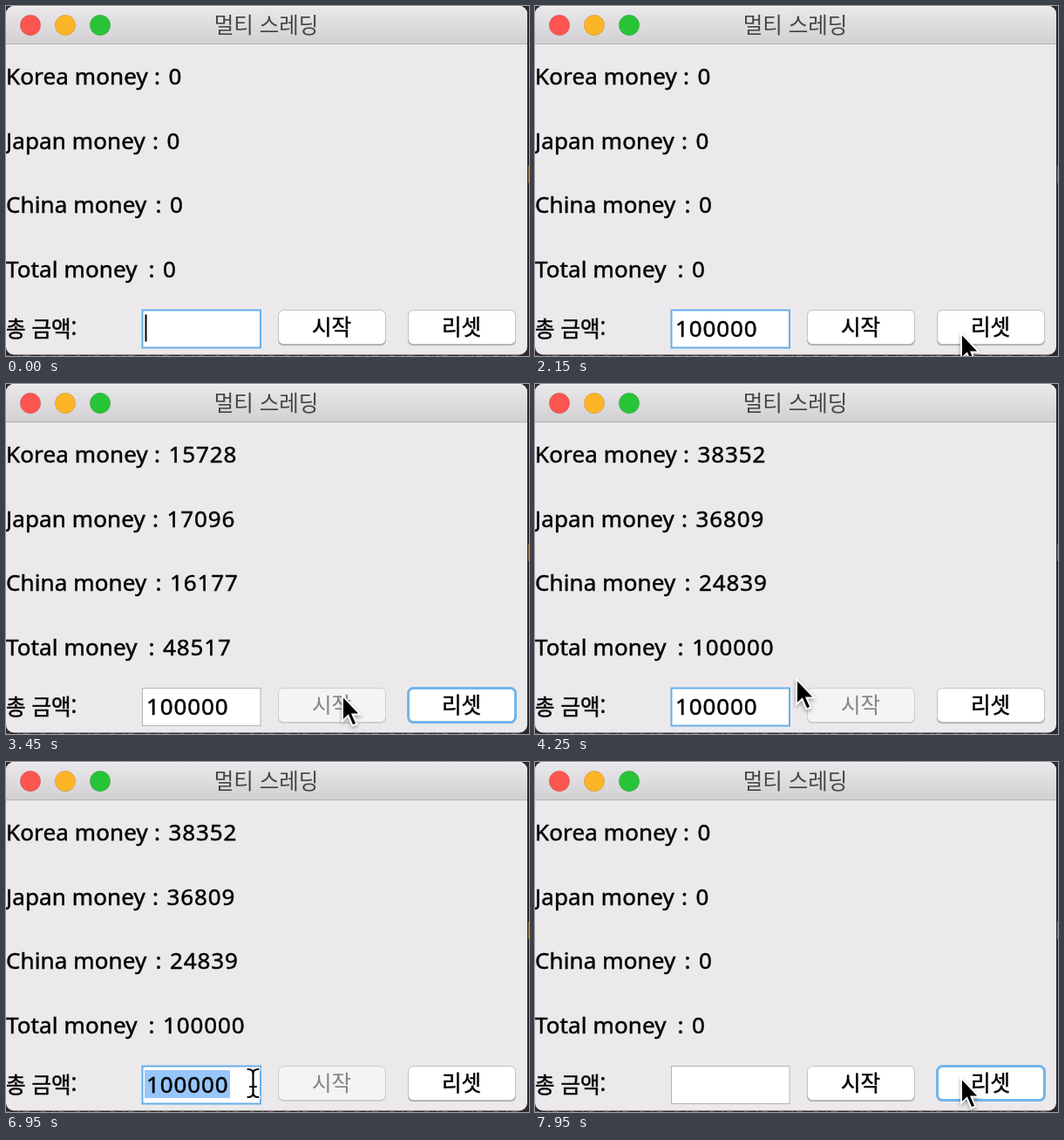
An HTML page for the animation above (8000 ms loop, 600x401 px).

```html
<!DOCTYPE html>
<html lang="ko">
<head>
<meta charset="utf-8">
<title>멀티 스레딩</title>
<style>
  html, body { margin: 0; width: 100%; height: 100%; overflow: hidden; background: #2c282b; }
  svg { display: block; width: 600px; height: 401px; }
  text {
    font: 26px "Noto Sans", "Open Sans", sans-serif; letter-spacing: .12px; white-space: pre;
    fill: #050505; stroke: #050505; stroke-width: .5px;
  }
  .ko { font: 24.5px "Noto Sans CJK KR", "Noto Sans CJK", sans-serif; letter-spacing: 0; }
  .mid { text-anchor: middle; }
  .num { letter-spacing: .9px; }
  .title { fill: #464446; stroke: none; }
  .button rect { fill: #fff; stroke: #c3c1c3; }
  .button .shade { fill: #a9a7a9; stroke: none; }
  .button.focus .face { stroke: #73b5ec; stroke-width: 3; }
  .button.off .face { fill: #f5f3f5; stroke: #cfcdcf; }
  .button.off .shade { fill: #cfcdcf; }
  .button.off text { fill: #858385; stroke: none; }
  #box { fill: #fff; stroke: #b4b2b4; }
  #box.focus { stroke: #68ade7; stroke-width: 2; }
  #arrow { filter: drop-shadow(0 2px 2px #0005); }
</style>
</head>
<body>
<svg viewBox="0 0 600 401">
  <defs>
    <linearGradient id="bar" x2="0" y2="1">
      <stop stop-color="#eae8ea"/><stop offset="1" stop-color="#d2d0d2"/>
    </linearGradient>
    <clipPath id="frame"><rect width="598" height="399.5" rx="9"/></clipPath>
    <path id="beamShape" d="M-6-16Q0-16 0-11Q0-16 6-16M0-11V11M-6 16Q0 16 0 11Q0 16 6 16M-3.5 4H3.5"/>
  </defs>
  <path d="M0 400.5H600" stroke="#6b5058" stroke-dasharray="5 9 2 4 7 13"/>
  <path d="M599.5 183V203" stroke="#8a6a3a"/>
  <g clip-path="url(#frame)">
    <rect width="600" height="401" fill="#ebe9eb"/>
    <rect width="600" height="43" fill="url(#bar)"/>
    <path d="M0 43.5H600" stroke="#b3b1b3"/>
    <path d="M0 .5H600" stroke="#f6f4f6"/>
  </g>
  <g stroke-opacity=".12" stroke="#000">
    <circle cx="28" cy="22" r="11.7" fill="#fd5550"/>
    <circle cx="68" cy="22" r="11.7" fill="#fdb528"/>
    <circle cx="108" cy="22" r="11.7" fill="#28c438"/>
  </g>
  <text class="ko mid title" x="298.5" y="31">멀티 스레딩</text>
  <g id="rows"></g>
  <text class="ko" x="0" y="379">총 금액:</text>
  <rect id="box" x="156.5" y="348.5" width="135.5" height="43"/>
  <rect id="selection" x="159" y="353" width="98" height="32" fill="#97c6fa"/>
  <text id="amount" class="num" x="161" y="379"></text>
  <rect id="caret" y="353.5" width="2" height="31"/>
  <g id="start" class="button">
    <rect class="shade" x="312" y="349" width="124" height="40" rx="6"/>
    <rect class="face" x="312.5" y="348.5" width="123" height="39" rx="6"/>
    <text class="ko mid" x="373.5" y="376.5">시작</text>
  </g>
  <g id="reset" class="button">
    <rect class="shade" x="461" y="349" width="124" height="40" rx="6"/>
    <rect class="face" x="461.5" y="348.5" width="123" height="39" rx="6"/>
    <text class="ko mid" x="522.5" y="376.5">리셋</text>
  </g>
  <path id="arrow" d="M0 0V29L6.5 23L11.5 34.5L16.5 32.5L11.5 21.5H20.5Z" stroke="#fff" stroke-width="2"/>
  <g id="beam" fill="none" stroke-linecap="round">
    <use href="#beamShape" stroke="#fff" stroke-width="5"/>
    <use href="#beamShape" stroke="#000" stroke-width="2.2"/>
  </g>
</svg>
<script>
const LOOP = 8000, STEP = 50;
const RUN = 3300, HALF = 3450, DONE = 3600, CLICK = 3750, SELECT = 6850, CLEAR = 7900;
const DIGIT = 15.8;
const keyTimes = [300, 600, 850, 1050, 1250, 1650];
const rows = [
  { word: 'Korea', x: 186.5, half: 15728, end: 38352 },
  { word: 'Japan', x: 184.5, half: 17096, end: 36809 },
  { word: 'China', x: 188, half: 16177, end: 24839 },
  { word: 'Total', x: 180, half: 48517, end: 100000 }
];
// time, x, y
const pointerPath = [
  [2150, 489, 375], [2300, 472, 372], [2600, 408, 352], [2800, 388, 357],
  [3300, 388, 357], [3400, 386, 357], [3500, 386, 357], [3750, 282, 369],
  [3950, 300, 338], [4250, 300, 338], [4450, 318, 368], [4650, 318, 368],
  [4950, 285.5, 370], [5050, 283.5, 368], [7400, 283.5, 368], [7800, 489, 362]
];

const $ = id => document.getElementById(id);
const show = (id, on) => $(id).style.display = on ? '' : 'none';
const within = (t, from, to) => t >= from && t < to;
const mix = (a, b, k) => a + (b - a) * Math.max(0, Math.min(1, k));

function addText(x, y, content, className = '') {
  const node = document.createElementNS('http://www.w3.org/2000/svg', 'text');
  node.setAttribute('x', x);
  node.setAttribute('y', y);
  node.setAttribute('class', className);
  node.textContent = content;
  return $('rows').appendChild(node);
}

rows.forEach((row, i) => {
  const y = 90 + i * 73.7;
  addText(0, y, row.word + ' money');
  addText(row.x - 16.5, y, ':');
  row.value = addText(row.x, y, '0', 'num');
});

function money(row, t) {
  if (t >= CLEAR) return 0;
  const value = t < HALF
    ? mix(0, row.half, (t - RUN) / (HALF - RUN))
    : mix(row.half, row.end, (t - HALF) / (DONE - HALF));
  return Math.round(value);
}

function pointerAt(t) {
  const next = pointerPath.findIndex(p => p[0] > t);
  if (next < 0) return pointerPath.at(-1).slice(1);
  const [t0, x0, y0] = pointerPath[next - 1], [t1, x1, y1] = pointerPath[next];
  const k = (t - t0) / (t1 - t0);
  return [mix(x0, x1, k), mix(y0, y1, k)];
}

// The caret blinks every half second, restarting at each key or click.
function caretOn(t) {
  if (within(t, RUN, CLICK) || t >= SELECT) return false;
  const since = [0, ...keyTimes, CLICK, 6800].filter(k => k <= t).at(-1);
  return Math.floor((t - since) / 500) % 2 === 0;
}

function drawPointer(t) {
  const visible = t >= pointerPath[0][0];
  const [x, y] = visible ? pointerAt(t) : [0, 0];
  const overField = within(x, 156, 293) && within(y, 348, 392);
  show('arrow', visible && !overField);
  show('beam', visible && overField);
  for (const id of ['arrow', 'beam']) $(id).setAttribute('transform', `translate(${x} ${y})`);
}

function draw(t) {
  rows.forEach(row => row.value.textContent = money(row, t));

  const typed = keyTimes.filter(k => k <= t).length;
  $('amount').textContent = t < CLEAR ? '100000'.slice(0, typed) : '';
  $('caret').setAttribute('x', 159.5 + typed * (DIGIT + .2));
  show('caret', caretOn(t));
  show('selection', within(t, SELECT, CLEAR));

  const resetFocus = within(t, RUN, CLICK) || t >= CLEAR;
  $('box').classList.toggle('focus', !resetFocus);
  $('reset').classList.toggle('focus', resetFocus);
  $('start').classList.toggle('off', within(t, RUN, CLEAR));
  drawPointer(t);
}

const began = performance.now();
function tick() {
  const t = (performance.now() - began) % LOOP;
  draw(Math.floor(t / STEP) * STEP);
  requestAnimationFrame(tick);
}
tick();
</script>
</body>
</html>
```
